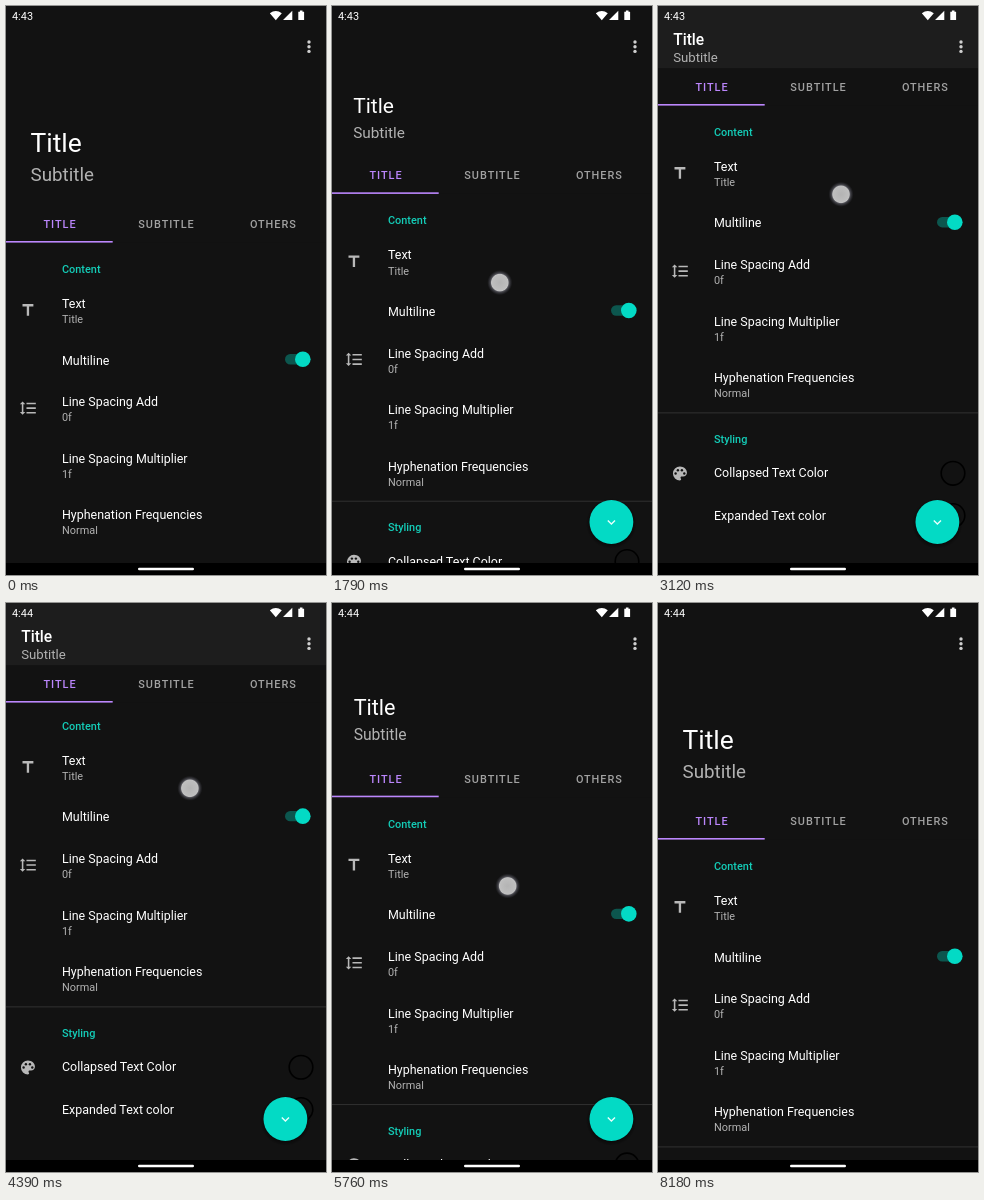
An HTML page for the animation above (8210 ms loop, 320 px wide and 569 px high).

```html
<!DOCTYPE html>
<html lang="en">
<head>
<meta charset="utf-8">
<title>Collapsing toolbar</title>
<style>
html, body { margin: 0; width: 100%; height: 100%; overflow: hidden; background: #121212; }
svg { display: block; width: 100vw; height: 100vh; font-family: Roboto, sans-serif; }
.head { font-size: 10.9px; font-weight: 500; fill: #14cdb8; }
.name { font-size: 12.45px; fill: #fff; }
.note { font-size: 10.9px; fill: #b2b2b2; }
.tab { font-size: 10.9px; font-weight: 500; letter-spacing: .0893em; fill: #a2a2a2; text-anchor: middle; }
.icon { fill: #b8b8b8; }
</style>
</head>
<body>
<svg viewBox="0 0 320 569" preserveAspectRatio="none">
  <defs>
    <radialGradient id="touch">
      <stop offset="0" stop-color="#bcbcbc" stop-opacity=".95"/>
      <stop offset=".56" stop-color="#c6c6c6" stop-opacity=".95"/>
      <stop offset=".66" stop-color="#d4d4d4" stop-opacity=".9"/>
      <stop offset=".74" stop-color="#74747e" stop-opacity=".6"/>
      <stop offset="1" stop-color="#40404c" stop-opacity="0"/>
    </radialGradient>
    <radialGradient id="wave" gradientUnits="userSpaceOnUse" cx="160" cy="353" r="190">
      <stop offset="0" stop-color="#fff" stop-opacity=".2"/>
      <stop offset="1" stop-color="#fff" stop-opacity=".13"/>
    </radialGradient>
    <radialGradient id="shade">
      <stop offset=".8" stop-color="#000" stop-opacity=".5"/>
      <stop offset="1" stop-color="#000" stop-opacity="0"/>
    </radialGradient>
    <clipPath id="row"><rect y="333" width="320" height="41"/></clipPath>
  </defs>
  <rect width="320" height="569" fill="#121212"/>
  <g id="list">
    <circle id="ripple" cx="160" cy="353" fill="url(#wave)" clip-path="url(#row)"/>
    <rect id="rule" y="543.4" width="320" height="1" fill="#303030"/>
    <g class="icon">
      <path transform="translate(12.6 295) scale(.778)" d="M5 4v3h5.5v12h3V7H19V4z"/>
      <path transform="translate(12.7 392.8) scale(.778)" d="M6 7h2.5L5 3.5 1.5 7H4v10H1.5L5 20.5 8.5 17H6zM10 5v2h12V5zM10 19h12v-2H10zM10 13h12v-2H10z"/>
      <path transform="translate(12.6 595.2) scale(.778)" d="M12 3a9 9 0 0 0 0 18c.83 0 1.5-.67 1.5-1.5 0-.39-.15-.74-.39-1.01-.23-.26-.38-.61-.38-.99 0-.83.67-1.5 1.5-1.5H16c2.76 0 5-2.24 5-5 0-4.42-4.03-8-9-8z"/>
    </g>
    <g id="dots" fill="#121212"></g>
    <rect x="279" y="348" width="22" height="10.4" rx="5.2" fill="#0c564e"/>
    <circle cx="296.8" cy="353.2" r="7.8" fill="#03dac5"/>
    <g fill="none" stroke="#000" stroke-width="1.6">
      <circle cx="295" cy="604.3" r="11.8"/>
      <circle cx="295" cy="646.6" r="11.8"/>
    </g>
  </g>
  <g id="fab">
    <circle cy="1.5" r="25.5" fill="url(#shade)"/>
    <circle r="21.9" fill="#03dac5"/>
    <path d="M-3.6-1.6L0 1.9 3.6-1.6" fill="none" stroke="#e8fffc" stroke-width="1.4"/>
  </g>
  <rect id="bar" width="320" fill="#121212"/>
  <rect id="scrim" width="320" height="62.2" fill="#1d1d1d"/>
  <g id="tabs">
    <text class="tab" x="54" y="222" style="fill:#bb86fc">TITLE</text>
    <text class="tab" x="160.5" y="222">SUBTITLE</text>
    <text class="tab" x="267.4" y="222">OTHERS</text>
    <rect y="235" width="106.7" height="1.6" fill="#bb86fc"/>
  </g>
  <text id="title" fill="#fff">Title</text>
  <text id="sub" fill="#b2b2b2">Subtitle</text>
  <g fill="#fff">
    <text id="clock" x="6" y="13.7" font-size="10.9"></text>
    <path d="M263.8 7.2Q269.8 2.8 275.8 7.2L269.8 14.2zM286.3 4.7V14H277zM292.3 5.7h1.6V4.6h2.6v1.1h1.6V14h-5.8z"/>
    <g fill="#cfcfcf">
      <circle cx="303" cy="36" r="1.7"/><circle cx="303" cy="40.7" r="1.7"/><circle cx="303" cy="45.4" r="1.7"/>
    </g>
  </g>
  <rect y="557" width="320" height="12" fill="#000"/>
  <rect x="132" y="561.7" width="56" height="2.6" rx="1.3" fill="#fff"/>
  <circle id="finger" r="12.6" fill="url(#touch)"/>
</svg>
<script>
const LOOP = 8210, RANGE = 137, LIFT = 6970;
const NS = 'http://www.w3.org/2000/svg';
const el = {};
document.querySelectorAll('[id]').forEach(e => el[e.id] = e);

function set(node, attrs) {
  for (const k in attrs) node.setAttribute(k, attrs[k]);
  return node;
}
function add(parent, tag, attrs, text) {
  const e = set(document.createElementNS(NS, tag), attrs);
  if (text) e.textContent = text;
  parent.appendChild(e);
}

[
  ['head', 267, 'Content'],
  ['name', 302, 'Text'], ['note', 317.3, 'Title'],
  ['name', 358.5, 'Multiline'],
  ['name', 400.4, 'Line Spacing Add'], ['note', 415.4, '0f'],
  ['name', 457, 'Line Spacing Multiplier'], ['note', 472, '1f'],
  ['name', 513.4, 'Hyphenation Frequencies'], ['note', 528.4, 'Normal'],
  ['head', 574, 'Styling'],
  ['name', 608.5, 'Collapsed Text Color'],
  ['name', 651.2, 'Expanded Text color']
].forEach(([cls, y, text]) => add(el.list, 'text', { class: cls, x: 56, y }, text));

// wells of the palette icon
[[17.6, 604.5], [19.9, 601.3], [23.9, 601.3], [26.3, 604.5]]
  .forEach(([cx, cy]) => add(el.dots, 'circle', { cx, cy, r: 1.2 }));

// finger travel: [ms, pixels dragged up] and [ms, x]
const DRAG = [[150, -6.5], [800, -4], [980, 0], [1360, 18], [1700, 42], [2210, 80], [2550, 104],
  [3120, 137], [3390, 141], [4300, 141], [4560, 135], [5030, 99], [5240, 83.5], [6105, 15], [6610, -24], [6970, -42]];
const SIDE = [[150, 159], [1360, 160.5], [2210, 176.5], [3120, 183], [5030, 184], [6610, 160.5], [6970, 157]];

const clamp = (v, a = 0, b = 1) => Math.min(b, Math.max(a, v));
const ramp = (t, start, length) => clamp((t - start) / length);
const smooth = p => p * p * (3 - 2 * p);
const mix = (a, b, p) => a + (b - a) * p;

// smooth curve through the points without overshoot
function track(pts, t) {
  const n = pts.length - 1;
  if (t <= pts[0][0]) return pts[0][1];
  if (t >= pts[n][0]) return pts[n][1];
  const slope = i => (pts[i + 1][1] - pts[i][1]) / (pts[i + 1][0] - pts[i][0]);
  const tangent = i => {
    if (i === 0 || i === n) return slope(Math.min(i, n - 1));
    const a = slope(i - 1), b = slope(i);
    return a * b <= 0 ? 0 : 2 * a * b / (a + b);
  };
  let i = 0;
  while (t > pts[i + 1][0]) i++;
  const h = pts[i + 1][0] - pts[i][0], p = (t - pts[i][0]) / h, q = 1 - p;
  return pts[i][1] * (1 + 2 * p) * q * q + pts[i + 1][1] * p * p * (3 - 2 * p)
    + h * p * q * (tangent(i) * q - tangent(i + 1) * p);
}

function label(node, f, from, to, centreFrom, centreTo, power) {
  const size = mix(to, from, Math.pow(1 - f, power));
  set(node, {
    x: mix(24.5, 15.2, f),
    y: mix(centreFrom, centreTo, f) + size * .355,
    'font-size': size
  });
}

function draw(t) {
  const drag = track(DRAG, t);
  const scroll = Math.max(0, drag);
  const top = Math.min(scroll, RANGE);
  const f = top / RANGE;

  const over = t > 5000 ? Math.max(0, -drag) : 0;
  const spring = Math.pow(1 - ramp(t, LIFT, 300), 2);
  const stretch = 1 + .01 * over / (over + 8) * spring;
  set(el.list, { transform: `translate(0 ${237 - scroll}) scale(1 ${stretch}) translate(0 -237)` });
  set(el.rule, { opacity: t < 30 ? 0 : 1 });

  set(el.bar, { height: 236.6 - top });
  set(el.tabs, { transform: `translate(0 ${-top})` });
  set(el.scrim, { opacity: smooth(ramp(top, 120, 15)) });
  label(el.title, f, 26.45, 15.6, 136.7, 33.2, 1.6);
  label(el.sub, f, 18.8, 13.2, 168, 51.2, 2.2);
  set(el.title, { 'font-weight': f > .98 ? 500 : 400 });
  el.clock.textContent = t < 3560 ? '4:43' : '4:44';

  set(el.ripple, {
    r: mix(20, 190, smooth(ramp(t, 230, 450))),
    opacity: ramp(t, 230, 120) * (1 - ramp(t, 1280, 380))
  });

  const shown = smooth(ramp(t, 1170, 240)) * (1 - smooth(ramp(t, 6290, 170)));
  set(el.fab, {
    transform: `translate(279.4 516) scale(${mix(.3, 1, shown)})`,
    opacity: clamp(shown * 2)
  });

  set(el.finger, {
    cx: track(SIDE, t),
    cy: 325.3 - drag,
    opacity: t >= 150 && t < LIFT ? 1 : 0
  });
}

function tick() {
  draw(performance.now() % LOOP);
  requestAnimationFrame(tick);
}
tick();
</script>
</body>
</html>
```
